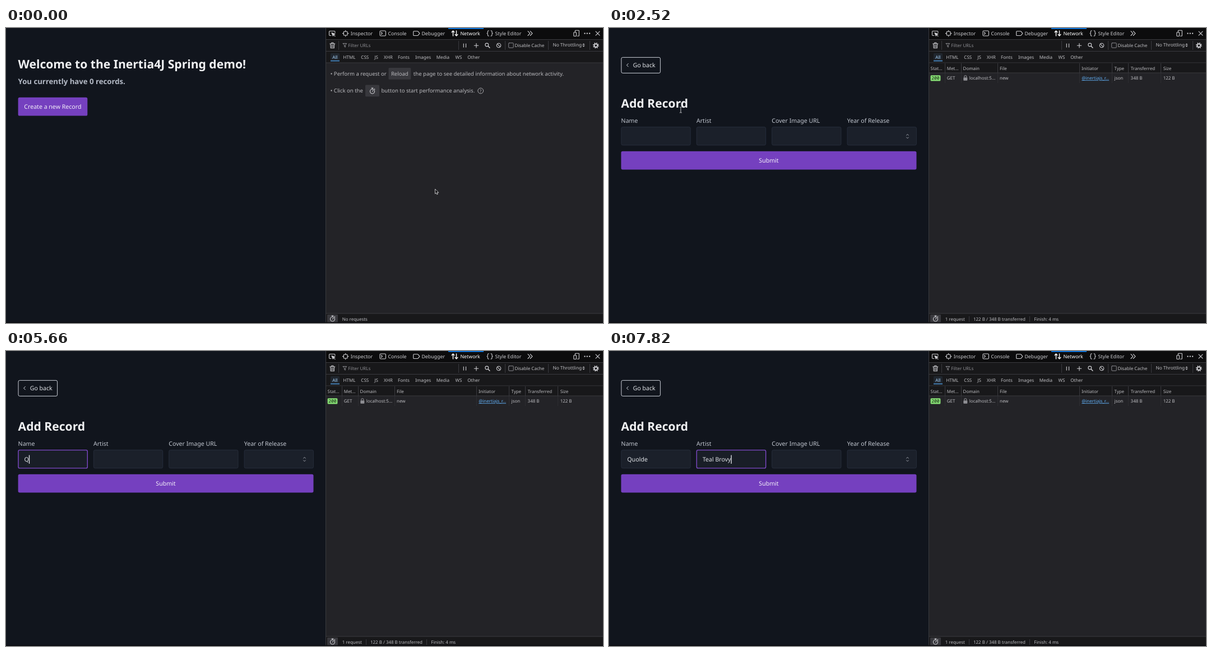
An HTML page for the animation above (8000 ms loop, 1065x526 px).

```html
<!DOCTYPE html>
<html lang="en">
<head>
<meta charset="utf-8">
<title>Record demo</title>
<style>
  html, body { margin: 0; width: 100%; height: 100%; overflow: hidden; background: #11151d; }
  svg { display: block; width: 1065px; height: 526px; }
  text { font-family: "Noto Sans", sans-serif; white-space: pre; text-rendering: geometricPrecision; }
  .app { font-size: 10.6px; fill: #c2c7d0; }
  .h1 { font-size: 21.1px; font-weight: 700; fill: #f0f1f3; }
  .h4 { font-size: 13.2px; font-weight: 700; fill: #b3b9c5; }
  .on { fill: #f4f0fa; }
  .value { fill: #e0e3e7; }
  .tabs { font-size: 8.8px; fill: #cfcfd3; }
  .tools { font-size: 8.05px; fill: #bfbfc3; }
  .table { font-size: 7.95px; fill: #bcbcc0; }
  .hints { font-size: 9.55px; fill: #b9b9bd; }
  .icons { fill: none; stroke: #cfcfd3; stroke-width: 1.1; stroke-linecap: round; stroke-linejoin: round; }
  .lines { stroke: #3a3a3f; stroke-width: 1; fill: none; }
</style>
</head>
<body>
<svg viewBox="0 0 1065 526" xmlns="http://www.w3.org/2000/svg">
  <defs>
    <g id="watch" class="icons">
      <circle cy="1" r="4"/><path d="M-1.5 -5h3M0 -5v2M0 1l1.5 -1.7M3.6 -3.4l.8 .8"/>
    </g>
  </defs>

  <rect width="570" height="526" fill="#11151d"/>

  <g id="home" class="app">
    <text class="h1" x="21.6" y="72">Welcome to the Inertia4J Spring demo!</text>
    <text class="h4" x="21.6" y="99.7">You currently have 0 records.</text>
    <rect x="21.6" y="123.8" width="123.7" height="32.8" rx="2.7" fill="#7540bf"/>
    <rect id="hover" x="21.6" y="123.8" width="123.7" height="32.8" rx="2.7" fill="#8352c5"/>
    <text class="on" x="32.3" y="144">Create a new Record</text>
  </g>

  <g id="form" class="app">
    <rect x="22" y="52.4" width="69.6" height="28" rx="2.5" fill="none" stroke="#dfe3eb" stroke-width=".9"/>
    <path d="M34.6 63.2l-3 3 3 3" fill="none" stroke="#dfe3eb"/>
    <text class="value" x="42.7" y="70.2">Go back</text>
    <text class="h1" x="21.6" y="142">Add Record</text>
    <g id="inputs"></g>
    <path d="M530.4 191.6l2.1 -2.2 2.1 2.2M530.4 194.6l2.1 2.2 2.1 -2.2" fill="none" stroke="#b0b4bd" stroke-width=".9"/>
    <text class="value" id="name" x="32.6" y="197"></text>
    <text class="value" id="artist" x="166.9" y="197"></text>
    <rect id="caret" y="185.6" width="1.3" height="15.4" fill="#e6e8ec"/>
    <rect x="21.6" y="219.8" width="526.9" height="32.7" rx="2.7" fill="#7540bf"/>
    <text class="on" x="285" y="240.1" text-anchor="middle">Submit</text>
  </g>

  <rect x="570" width="495" height="526" fill="#232327"/>
  <rect x="570" width="495" height="20" fill="#0c0c0d"/>
  <rect x="570" y="20" width="495" height="42" fill="#18181a"/>
  <rect x="570" y="509" width="495" height="17" fill="#18181a"/>
  <path class="lines" d="M570.5 0V526M570 20.5H1065M570 41.5H1065M570 62H1065M570 509H1065"/>

  <rect x="789" width="63" height="1.6" fill="#0a84ff"/>
  <g class="tabs">
    <text x="614.7" y="12.8">Inspector</text>
    <text x="681.4" y="12.8">Console</text>
    <text x="741.4" y="12.8">Debugger</text>
    <text x="810.4" y="12.8" fill="#fff">Network</text>
    <text x="872.6" y="12.8">Style Editor</text>
  </g>
  <g class="icons">
    <path d="M580 13.5h-2.3q-1.2 0 -1.2 -1.2V6.700q0 -1.200 1.200 -1.200H585.700q1.200 0 1.200 1.200V8.500"/>
    <path d="M581 8.500l6 2.300 -2.500 1 -1.100 2.500z" fill="#cfcfd3"/>
    <path d="M587 14.600l-2 -2"/>
    <rect x="602.300" y="6.200" width="6.800" height="6.800" rx="1"/>
    <path d="M605.700 4.300v1.500M605.700 13.400v1.500M600.400 9.600h1.500M609.500 9.600h1.500"/>
    <rect x="667" y="5" width="10.400" height="9" rx="1.600"/>
    <path d="M669.300 7.500l2 2 -2 2"/>
    <path d="M727.700 5.700h6.300q.8 0 1.300 .6l2.600 3.300 -2.600 3.300q-.5 .6 -1.300 .6h-6.300q-1 0 -1 -1v-5.800q0 -1 1 -1z"/>
    <path d="M797.500 14V5.200M795.200 7.500l2.300 -2.400 2.300 2.400M803.500 5V13.800M801.200 11.500l2.300 2.400 2.300 -2.400" stroke="#fff" stroke-width="1.400"/>
    <path d="M861.300 4.800q-2 0 -2 1.700v1.500q0 1.500 -1.300 1.500 1.300 0 1.300 1.500v1.500q0 1.700 2 1.700M865 4.800q2 0 2 1.700v1.500q0 1.500 1.300 1.500 -1.300 0 -1.300 1.500v1.500q0 1.700 -2 1.700"/>
    <path d="M931 5.700l3.800 3.900 -3.800 3.900M935.200 5.700l3.800 3.900 -3.800 3.900"/>
    <path d="M1015.300 7.500V5q0 -.8 .8 -.8h5.400q.8 0 .8 .8v8.500q0 .8 -.8 .8h-2.200"/>
    <rect x="1012.800" y="7.800" width="4.600" height="6.700" rx=".8"/>
    <path d="M1032.400 9.600h.1M1036.700 9.600h.1M1041 9.600h.1" stroke-width="2.400"/>
    <path d="M1052 6.200l7 7M1059 6.200l-7 7"/>
    <path d="M577.800 28h9M580.700 27.700v-1.400h3.200v1.400M578.800 28.300l.5 7.400h6l.5 -7.400M581.100 30v4M583.500 30v4"/>
    <path d="M601.300 27.500h6.400l-2.400 3.200v3.500l-1.600 -1v-2.500z" stroke="#97979b" stroke-width=".9"/>
    <path d="M816.300 28v6.200M820.500 28v6.200M835.300 31.200h7.400M839 27.500v7.400"/>
    <circle cx="857.800" cy="30" r="2.900"/><path d="M860 32.300l2.900 2.900" stroke-width="1.500"/>
    <circle cx="879" cy="31" r="3.700"/><path d="M876.500 28.400l5.100 5.200"/>
    <rect x="896.700" y="26.700" width="8.500" height="8.500" rx="1" stroke="#97979b" stroke-width=".9"/>
    <path d="M1028.800 29.400l1.600 -1.700 1.600 1.700zM1028.800 31.700l1.600 1.700 1.600 -1.700z" fill="#cfcfd3" stroke-width=".4"/>
    <circle cx="1052.300" cy="31.200" r="4.500" stroke-width="1.700" stroke-dasharray="1.770" stroke-linecap="butt"/>
    <circle cx="1052.300" cy="31.200" r="2.800" stroke-width="1.800"/>
  </g>
  <path class="lines" d="M593.500 23v16M807.500 23v16M890.500 23v16M967.500 23v16M1041.500 23v16"/>

  <rect x="579" y="45" width="16" height="14" rx="1.500" fill="#20262e"/>
  <rect x="579" y="58" width="16" height="1.300" fill="#4f9fe6"/>
  <g class="tools">
    <text x="610.300" y="33.900" fill="#8d8d92">Filter URLs</text>
    <text x="907.400" y="33.900">Disable Cache</text>
    <text x="975.400" y="33.200" font-size="8.250">No Throttling</text>
    <text x="582.300" y="55" fill="#a9d4fb">All</text>
    <text x="601.500" y="55">HTML</text>
    <text x="633.300" y="55">CSS</text>
    <text x="657.300" y="55">JS</text>
    <text x="674" y="55">XHR</text>
    <text x="699" y="55">Fonts</text>
    <text x="730" y="55">Images</text>
    <text x="767.700" y="55">Media</text>
    <text x="801.500" y="55">WS</text>
    <text x="823.300" y="55">Other</text>
  </g>

  <g id="hints" class="hints">
    <text x="578.800" y="85">• Perform a request or</text>
    <rect x="682.500" y="71" width="39.700" height="20.800" rx="1.500" fill="#38383d"/>
    <text x="686.900" y="85">Reload</text>
    <text x="726.800" y="85">the page to see detailed information about network activity.</text>
    <text x="578.800" y="115">• Click on the</text>
    <rect x="641" y="101.600" width="25" height="20.600" rx="1.500" fill="#38383d"/>
    <use href="#watch" x="653.500" y="112"/>
    <text x="669.500" y="115">button to start performance analysis.</text>
    <circle cx="846.700" cy="112" r="4.900" fill="none" stroke="#b9b9bd" stroke-width=".9"/>
    <text x="846.700" y="114.700" text-anchor="middle" style="font-size:7.500px">?</text>
  </g>

  <g id="requests" class="table">
    <rect x="571" y="62.500" width="494" height="17.500" fill="#18181a"/>
    <path class="lines" d="M571 80H1065M599.500 63v17M628.500 63v17M693.500 63v17M839.500 63v17M897.500 63v17M926.500 63v17M984.500 63v17"/>
    <path class="lines" opacity=".45" d="M599.500 80v18M628.500 80v18M693.500 80v18M839.500 80v18M897.500 80v18M926.500 80v18M984.500 80v18"/>
    <text x="573.600" y="75">Stat…</text>
    <text x="602.700" y="75">Met…</text>
    <text x="631.600" y="75">Domain</text>
    <text x="697" y="75">File</text>
    <text x="843" y="75">Initiator</text>
    <text x="901.400" y="75">Type</text>
    <text x="930.800" y="75">Transferred</text>
    <text x="988.700" y="75">Size</text>
    <rect x="573.600" y="84.200" width="17.800" height="10.400" rx="1.500" fill="#86de74"/>
    <text x="582.500" y="92.200" text-anchor="middle" fill="#10200d" style="font-family:'Noto Sans Mono',monospace">200</text>
    <text x="602.700" y="92.200">GET</text>
    <rect x="632.300" y="88.300" width="7" height="5.400" rx=".8" fill="#8f8f94"/>
    <path d="M633.800 88.500v-1.800a2 2 0 0 1 4 0v1.800" fill="none" stroke="#8f8f94" stroke-width="1.100"/>
    <text x="642.700" y="92.200">localhost:5…</text>
    <text x="697" y="92.200">new</text>
    <text x="843.200" y="92.200" fill="#61b0f7" text-decoration="underline">@inertiajs_r…</text>
    <text x="901.600" y="92.200">json</text>
    <text x="930.600" y="92.200">348 B</text>
    <text x="988.700" y="92.200">122 B</text>
    <path class="lines" stroke-width=".8" d="M642.500 514v10M750.500 514v10"/>
    <text x="599.700" y="521.800">1 request</text>
    <text x="650" y="521.800">122 B / 348 B transferred</text>
    <text x="758.300" y="521.800">Finish: 4 ms</text>
  </g>
  <text id="idle" class="table" x="599.700" y="521.800">No requests</text>
  <rect x="573" y="511" width="19" height="14" rx="1" fill="#38383d"/>
  <use href="#watch" x="582.500" y="518"/>
  <rect y="524.500" width="1065" height="1.500" fill="#0a0b0f"/>

  <path id="arrow" d="M.500 .500V9l2 -1.700 1.300 2.900 1.500 -.7 -1.300 -2.700h2.700z" fill="#0c0c0e" stroke="#e8e8ea" stroke-width=".8" stroke-linejoin="round"/>
  <g id="beam" fill="none">
    <path d="M-2 -5h4M-2 5h4M0 -5V5" stroke="#0b0d12" stroke-width="2"/>
    <path d="M-2 -5h1.500l.5 .5 .5 -.5h1.500M-2 5h1.500l.5 -.5 .5 .5h1.500M0 -4.500V4.500" stroke="#dfe3e8" stroke-width=".9"/>
  </g>
</svg>

<script>
const LOOP = 8000, OPEN = 2520, FOCUS = 3220, TAB = 6340;
const $ = id => document.getElementById(id);
const show = (id, visible) => $(id).style.display = visible ? '' : 'none';
const ramp = (t, from, to) => Math.min(1, Math.max(0, (t - from) / (to - from)));

$('inputs').innerHTML = ['Name', 'Artist', 'Cover Image URL', 'Year of Release'].map((label, i) => {
  const box = `x="${22 + i * 134.37}" y="176.6" width="123.3" height="32.3" rx="2.5"`;
  return `<text x="${21.6 + i * 134.37}" y="168.6">${label}</text>
    <rect ${box} fill="#1b202a" stroke="#2a3140" stroke-width=".8"/>
    <rect ${box} class="ring" fill="#191e27" stroke="#7d48c6" stroke-width="1.400"/>`;
}).join('');
const rings = document.querySelectorAll('.ring');

// Each move: start, end, x, y; equal times make a jump
const moves = [
  [0, 0, 765, 286.6], [870, 870, 750, 281], [1230, 1230, 656.5, 240],
  [1730, 1940, 128, 146], [2840, 2970, 124, 182.5], [3290, 3470, 333, 114]
];
const typed = {
  name: ['Quolde', [5560, 5690, 5840, 6020, 6090, 6160]],
  artist: ['Teal Brovy', [6770, 6800, 6820, 6970, 7120, 7290, 7420, 7560, 7740, 7820]]
};

function pointer(t) {
  let [, , x, y] = moves[0];
  for (const [from, to, toX, toY] of moves) {
    if (t < from) break;
    const p = from === to ? 1 : ramp(t, from, to), ease = p * p * (3 - 2 * p);
    x += (toX - x) * ease;
    y += (toY - y) * ease;
  }
  return [x, y];
}

function draw(t) {
  const opened = t >= OPEN;
  show('home', !opened);
  show('hints', !opened);
  show('idle', !opened);
  show('form', opened);
  show('requests', opened);
  $('hover').style.opacity = ramp(t, 1860, 1980);

  for (const id in typed) {
    const [word, times] = typed[id];
    $(id).textContent = word.slice(0, times.filter(at => t >= at).length);
  }
  const leave = ramp(t, TAB, TAB + 200);
  const focus = [ramp(t, FOCUS, FOCUS + 200) * (1 - leave), leave, 0, 0];
  rings.forEach((ring, i) => ring.style.opacity = focus[i]);

  const field = $(t < TAB ? 'name' : 'artist');
  show('caret', t >= FOCUS && t < 4340 || t >= 5560);
  if (opened) $('caret').setAttribute('x', +field.getAttribute('x') + field.getComputedTextLength());

  const [x, y] = pointer(t);
  const overText = x < 146 && (opened ? y > 150 : y < 157) || opened && t < 2840;
  const moving = t < 5560;
  show('arrow', moving && !overText);
  show('beam', moving && overText);
  for (const id of ['arrow', 'beam']) $(id).setAttribute('transform', `translate(${x} ${y})`);
}

const start = performance.now();
function tick() {
  draw((performance.now() - start) % LOOP);
  requestAnimationFrame(tick);
}
tick();
</script>
</body>
</html>
```
